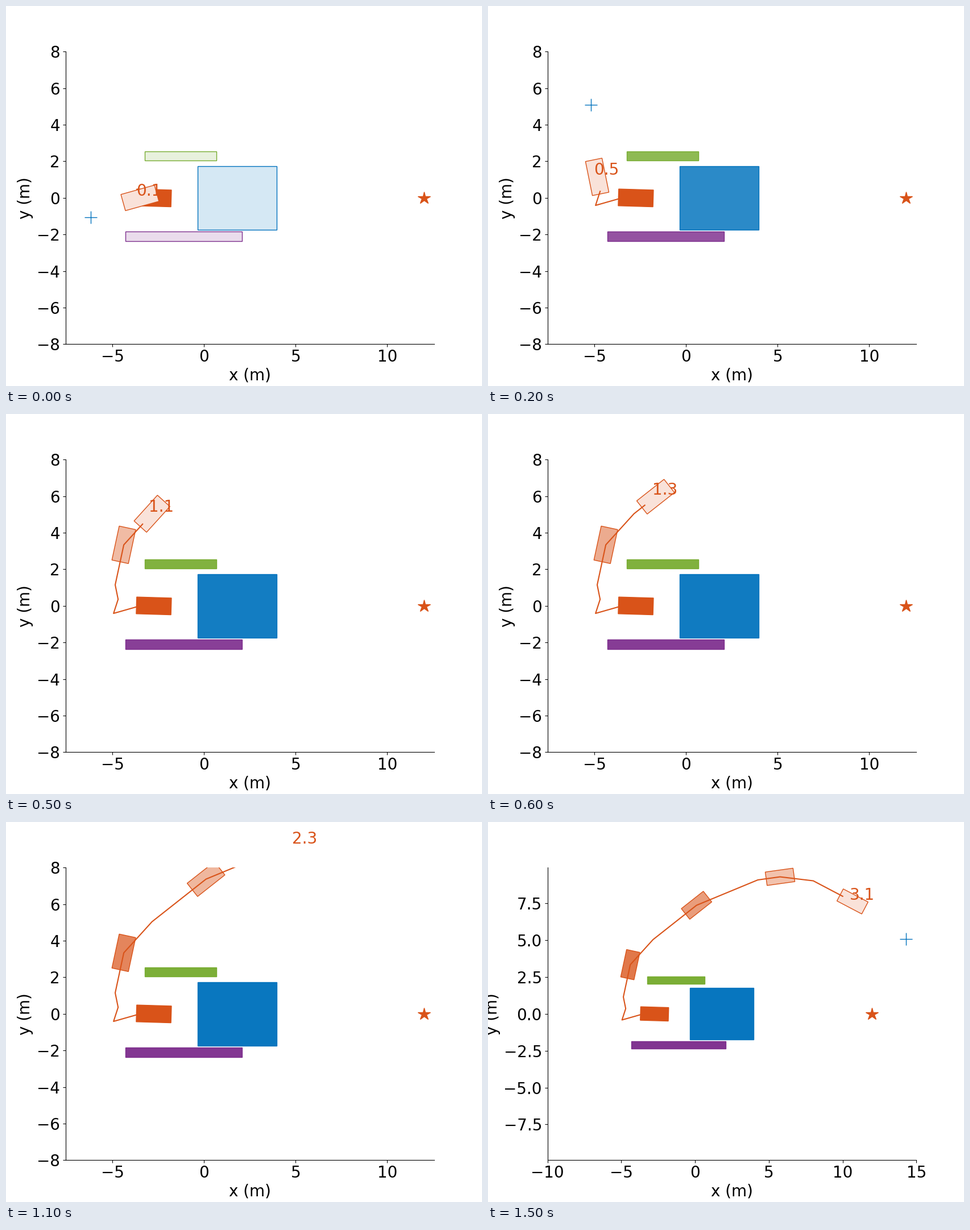
Recreate the animation shown at these times as a matplotlib script. Size 837x669 px, loop 2600 ms.

```python
import numpy as np
import matplotlib.pyplot as plt
from matplotlib.animation import FuncAnimation
from matplotlib.patches import Polygon

plt.rcParams.update({"font.family": "DejaVu Sans", "font.size": 20,
                     "xtick.major.pad": 2.8})

DPI = 100
STEPS = 16           # moving steps; the last one is held
TOTAL = 26           # 26 * 100 ms = one loop
REVERSING = 3        # the vehicle backs up until this state
TRAIL_EVERY = 8      # a ghost of the vehicle stays every 0.8 s
LENGTH, WIDTH = 1.9, 0.92
GOAL = (12, 0)

BLUE = np.array([0, 114, 189]) / 255
ORANGE = np.array([217, 83, 25]) / 255
PURPLE = np.array([126, 47, 142]) / 255
GREEN = np.array([119, 172, 48]) / 255

# x, y, width, height, colour
OBSTACLES = [(-.35, -1.75, 4.3, 3.5, BLUE),
             (-4.31, -2.35, 6.39, .5, PURPLE),
             (-3.25, 2.05, 3.92, .5, GREEN)]


def along(keys, count):
    """Points at 0, 1, 2, ... on straight runs between (time, x, y) keys."""
    when, x, y = np.transpose(keys)
    times = np.arange(count)
    return np.column_stack([np.interp(times, when, x), np.interp(times, when, y)])


# Vehicle centres every 0.1 s: back up, swing around the obstacles, head for the goal.
PATH = along([(0, -2.75, 0), (1, -3.51, 0), (3, -4.95, -.41), (4, -4.70, .36),
              (5, -4.86, 1.15), (8, -4.39, 3.34), (11, -2.85, 5.04),
              (16, .10, 7.37), (22, 4.25, 9.09), (24, 5.76, 9.30),
              (27, 8.01, 9.03), (31, 10.67, 7.63)], 2 * STEPS)

# Look-ahead point, one per step.
TARGETS = along([(0, -6.21, -1.06), (1, -8.93, -3.05), (2, -5.2, 5.1),
                 (3, -3.28, 6.46), (5, 0, 8.6), (9, 6, 11.5),
                 (14, 12.57, 7.67), (15, 14.31, 5.08)], STEPS)


def tint(color, k, now):
    """Fade from full colour at the start to a sixth at the present."""
    strength = 1 - 5 / 6 * k / now
    return 1 - strength * (1 - color)


def heading(k):
    """Steer while reversing, then face the direction of travel."""
    if k <= REVERSING:
        return np.radians(-1.7 + 20 * k - 2.7 * k ** 2)
    dx, dy = PATH[k] - PATH[k - 1]
    return np.arctan2(dy, dx)


def add_shape(corners, color, k, now):
    ax.add_patch(Polygon(corners, closed=True, fc=tint(color, k, now),
                         ec=color, lw=1, zorder=1))


def add_vehicle(k, now):
    c, s = np.cos(heading(k)), np.sin(heading(k))
    box = np.array([(-1, -1), (1, -1), (1, 1), (-1, 1)]) * (LENGTH / 2, WIDTH / 2)
    add_shape(box @ np.array([(c, s), (-s, c)]) + PATH[k], ORANGE, k, now)


def set_view(target_x, now):
    """Show the wide view when the data no longer fits the narrow one."""
    left = min(target_x, PATH[:now + 1, 0].min())
    right = max(target_x, GOAL[0])
    aspect = ax.bbox.width / ax.bbox.height
    if 1.05 * (right - left) > 16 * aspect:
        half = 12.5 / aspect
        ax.set(xlim=(-10, 15), ylim=(-half, half),
               xticks=np.arange(-10, 16, 5), yticks=np.arange(-7.5, 8, 2.5))
    else:
        half = 8 * aspect
        ax.set(xlim=(2.5 - half, 2.5 + half), ylim=(-8, 8),
               xticks=np.arange(-5, 11, 5), yticks=np.arange(-8, 9, 2))


def draw(frame):
    step = min(frame, STEPS - 1)
    now = 2 * step + 1
    ax.clear()
    ax.spines[["top", "right"]].set_visible(False)
    ax.set_xlabel("x (m)", labelpad=3.3)
    ax.set_ylabel("y (m)")

    for x, y, w, h, color in OBSTACLES:
        add_shape([(x, y), (x + w, y), (x + w, y + h), (x, y + h)], color, 1, now)
    for k in [*range(0, now, TRAIL_EVERY), now]:
        add_vehicle(k, now)

    ax.plot(*PATH[:now].T, color=ORANGE, lw=1.5)
    ax.plot(*GOAL, "*", color=ORANGE, ms=16)
    ax.plot(*TARGETS[step], "+", color=BLUE, ms=16)
    x, y = PATH[now]
    ax.text(x - .19, y + .115, f"{now / 10:.1f}", color=ORANGE)
    set_view(TARGETS[step][0], now)


# The tiny surplus keeps the pixel size from being rounded down.
fig, ax = plt.subplots(figsize=((837 + 1e-6) / DPI, (669 + 1e-6) / DPI), dpi=DPI)
anim = FuncAnimation(fig, draw, frames=TOTAL, interval=100,
                     init_func=lambda: None, repeat=True, repeat_delay=0)
plt.show()
```
